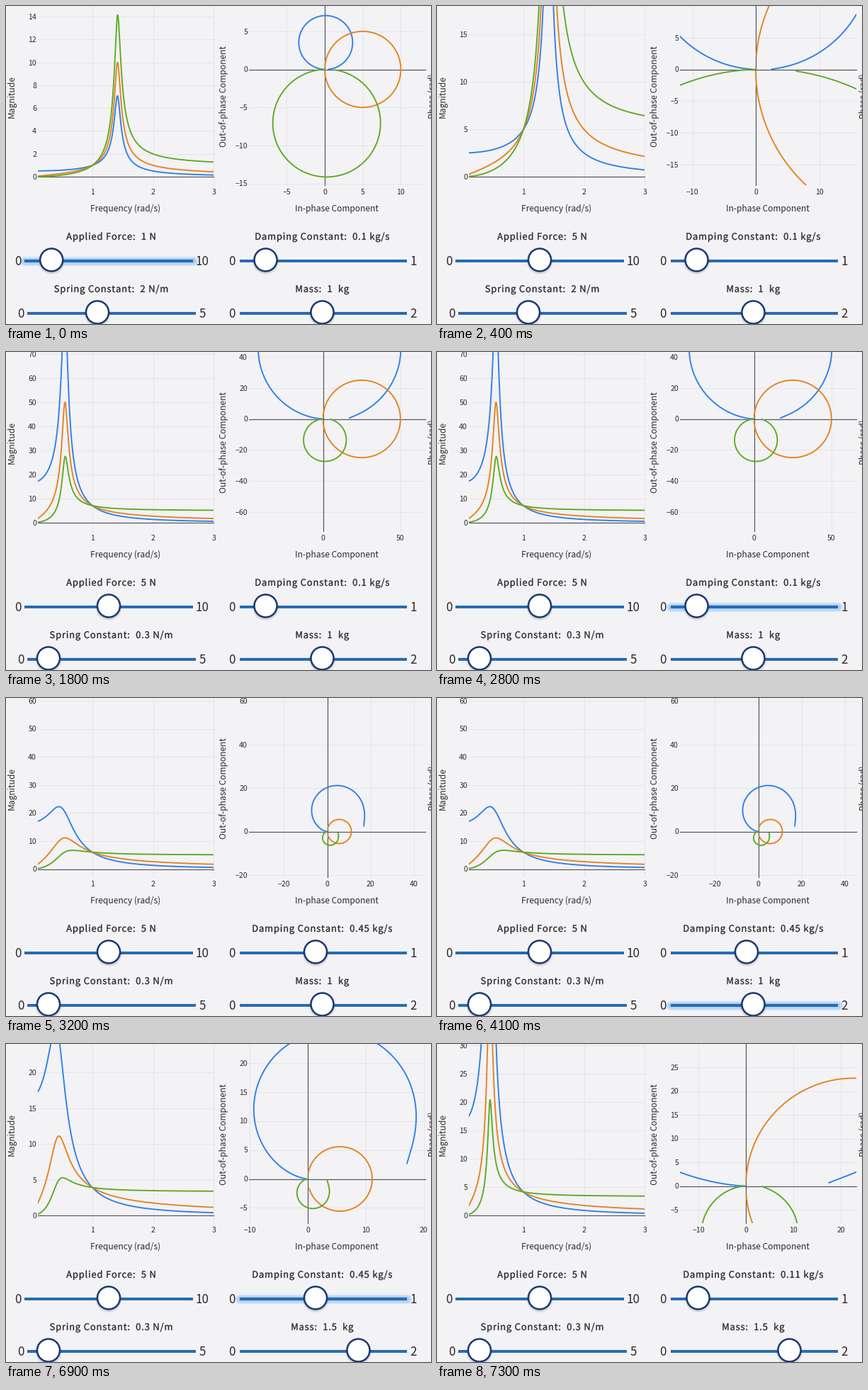
A matplotlib script that plays this animation: 600x449 px, repeating every 8000 ms.

```python
from functools import lru_cache

import numpy as np
import matplotlib.pyplot as plt
from matplotlib.animation import FuncAnimation
from matplotlib.patches import Circle, PathPatch, Rectangle
from matplotlib.path import Path
from matplotlib.textpath import TextPath
from matplotlib.transforms import Affine2D

W, H, DPI = 600, 449, 100
STEP_MS, LOOP_MS = 100, 8000
PT = 72 / DPI  # points per pixel
FONT = "Noto Sans CJK JP"

BG, GRID, AXIS, INK = "#f3f2f5", "#e5e5e8", "#55555a", "#2b2b2e"
TRACK, RING, GLOW = "#296bb3", "#1b3a70", "#5fb0f5"
BLUE, ORANGE, GREEN = "#2f80ea", "#e6831f", "#5dab22"

LEFT = (45, 293)       # horizontal extent of the magnitude plot
RIGHT = (343, 592)     # horizontal extent of the polar plot
BOTTOM = 253
OMEGA = np.linspace(0.1, 3, 1500)

# Views: left zero y, left scale, right zero x, right zero y, right scale
VIEW_START = np.array([241, 16.14, 450, 89.5, 10.74])
VIEW_FORCE = np.array([241, 13.4, 450, 89.5, 8.95])
VIEW_SPRING = np.array([241, 3.4, 447.5, 94.5, 2.187])
VIEW_DAMPED = np.array([241.5, 3.96, 453.5, 188.5, 3.065])
VIEW_MASS = np.array([242, 10.08, 426, 190.5, 8.19])
VIEW_END = np.array([242, 8.0, 436, 200.5, 6.7])

# start ms, (force, damping, spring, mass), view, tick steps (left y, right x, right y)
SCENES = [
    (0, (1, 0.1, 2, 1), VIEW_START, (2, 5, 5)),
    (300, (5, 0.1, 2, 1), VIEW_FORCE, (5, 10, 5)),
    (1800, (5, 0.1, 0.3, 1), VIEW_SPRING, (10, 50, 20)),
    (3100, (5, 0.45, 0.3, 1), VIEW_DAMPED, (10, 20, 20)),
    (4300, (5, 0.45, 0.3, 1.5), VIEW_MASS, (5, 10, 5)),
    (7100, (5, 0.28, 0.3, 1.5), VIEW_MASS + 0.5 * (VIEW_END - VIEW_MASS), (5, 10, 5)),
    (7200, (5, 0.16, 0.3, 1.5), VIEW_MASS + 0.85 * (VIEW_END - VIEW_MASS), (5, 10, 5)),
    (7300, (5, 0.11, 0.3, 1.5), VIEW_END, (5, 10, 5)),
]

# title, title centre, row y, track ends, thumb x at zero, px per unit,
# zero label x, maximum and its label x
SLIDERS = [
    ("Applied Force:  {:g} N", 148.5, 360, (26, 264), 44, 20.2, 17, "10", 277),
    ("Damping Constant:  {:g} kg/s", 446.3, 360, (330, 566), 346.4, 201.4, 318.7, "1", 575),
    ("Spring Constant:  {:g} N/m", 148.5, 434, (30, 268), 47.8, 40.6, 21, "5", 277),
    ("Mass:  {:g}  kg", 446.3, 434, (330, 566), 344.5, 102, 318.7, "2", 575),
]

# slider index, start ms, end ms
HOVERS = [(0, 0, 300), (2, 1400, 1800), (1, 2800, 3100), (3, 4100, 4300), (1, 6900, 7100)]

fig = plt.figure(figsize=(W / DPI, H / DPI), dpi=DPI, facecolor=BG)
ax = fig.add_axes([0, 0, 1, 1])
ax.set_xlim(0, W)
ax.set_ylim(H, 0)
ax.axis("off")
live = []


def panel(extent):
    x0, x1 = extent
    return Rectangle((x0, -1), x1 - x0, BOTTOM + 1, transform=ax.transData)


def line(x, y, color, width, clip=None, **kw):
    item, = ax.plot(x, y, color=color, lw=width * PT, **kw)
    if clip:
        item.set_clip_path(clip)
    return item


def text(x, y, s, px, ha="center", rotation=0):
    return ax.text(x, y, s, fontsize=px * PT, family=FONT, color=INK, ha=ha,
                   va="baseline", rotation=rotation, rotation_mode="anchor")


def ink_width(s, px):
    return TextPath((0, 0), s, size=px, prop={"family": FONT}).get_extents().width


@lru_cache(maxsize=None)
def advance(ch, px):
    return ink_width("|" + ch + "|", px) - ink_width("||", px)


@lru_cache(maxsize=None)
def spaced_path(s, px, gap):
    """Outline of s with letter spacing, centred on x = 0, y pointing down."""
    x, parts = 0, []
    for ch in s:
        if ch != " ":
            parts.append(TextPath((x, 0), ch, size=px, prop={"family": FONT}))
        x += advance(ch, px) + gap
    shift = Affine2D().translate(-(x - gap) / 2, 0).scale(1, -1)
    return Path.make_compound_path(*parts).transformed(shift)


def title(x, y, s):
    path = spaced_path(s, 13, 0.8).transformed(Affine2D().translate(x, y))
    return ax.add_patch(PathPatch(path, fc=INK, ec=INK, lw=0.35 * PT, zorder=3))


def ticks(low, high, step):
    return np.arange(np.ceil(low / step), np.floor(high / step) + 1) * step


def label(v):
    return f"{v:.0f}".replace("-", "\u2212") if v else "0"


def responses(force, damping, spring, mass):
    """Displacement, velocity and acceleration phasors."""
    x = force / (spring - mass * OMEGA**2 + 1j * damping * OMEGA)
    return x, 1j * OMEGA * x, -OMEGA**2 * x


def horizontals(extent, zero, scale, step):
    items = []
    for v in ticks((zero - BOTTOM) / scale, (zero - 1) / scale, step):
        y = zero - v * scale
        if v:
            items.append(line(extent, (y, y), GRID, 1, zorder=1))
        items.append(text(extent[0] - 2, y + 3.9, label(v), 10.5, "right"))
    items.append(line(extent, (zero, zero), AXIS, 1.2, zorder=1.5))
    return items


def draw_plots(values, view, steps):
    ly, ls, rx, ry, rs = view
    items = horizontals(LEFT, ly, ls, steps[0]) + horizontals(RIGHT, ry, rs, steps[2])
    for v in ticks((RIGHT[0] - rx) / rs, (RIGHT[1] - rx) / rs, steps[1]):
        x = rx + v * rs
        if v:
            items.append(line((x, x), (0, BOTTOM), GRID, 1, zorder=1))
        items.append(text(x, 265.5, label(v), 10.5))
    items.append(line((rx, rx), (0, BOTTOM), AXIS, 1.2, zorder=1.5))
    for z, color in zip(responses(*values), (BLUE, ORANGE, GREEN)):
        items.append(line(freq_x(OMEGA), ly - ls * abs(z), color, 1.9, panel(LEFT), zorder=2))
        items.append(line(rx + rs * z.real, ry + rs * z.imag, color, 1.9, panel(RIGHT), zorder=2))
    return items


def draw_thumb(slider, value):
    name, cx, y, _, zero, scale = slider[:6]
    x = zero + scale * value
    items = [title(cx, y - 30, name.format(value))]
    for r, alpha in ((18.8, 0.05), (17.6, 0.08)):
        items.append(ax.add_patch(Circle((x, y + 0.3), r, fc="black", ec="none",
                                         alpha=alpha, zorder=4)))
    items.append(ax.add_patch(Circle((x, y - 1.5), 16, fc="white", ec=RING,
                                     lw=2.5 * PT, zorder=5)))
    return items


def draw_glow(slider):
    y, track = slider[2], slider[3]
    return [line(track, (y, y), GLOW, w, alpha=0.17, zorder=2.5, solid_capstyle="round")
            for w in (6, 8.5, 11, 13.5)]


def freq_x(w):
    return 36.4 + 85.6 * w


def draw_static():
    for v in (1, 2, 3):
        x = freq_x(v)
        line((x, x), (0, BOTTOM), GRID, 1, zorder=1)
        text(x, 265.5, str(v), 10.5)
    text(168.5, 290, "Frequency (rad/s)", 12)
    text(466.5, 290, "In-phase Component", 12)
    text(12, 127.5, "Magnitude", 12, rotation=90)
    text(311, 127.5, "Out-of-phase Component", 12, rotation=90)
    text(606, 127.5, "Phase (rad)", 12, rotation=90)
    for _, _, y, track, _, _, zero_x, top, top_x in SLIDERS:
        line(track, (y, y), TRACK, 4, zorder=3, solid_capstyle="butt")
        text(zero_x, y + 6.5, "0", 17)
        text(top_x, y + 6.5, top, 17)


def update(frame):
    now = frame * STEP_MS
    while live:
        live.pop().remove()
    _, values, view, steps = [s for s in SCENES if s[0] <= now][-1]
    live.extend(draw_plots(values, view, steps))
    for slider, value in zip(SLIDERS, values_by_slider(values)):
        live.extend(draw_thumb(slider, value))
    for i, start, end in HOVERS:
        if start <= now < end:
            live.extend(draw_glow(SLIDERS[i]))
    return live


def values_by_slider(values):
    force, damping, spring, mass = values
    return force, damping, spring, mass


draw_static()
anim = FuncAnimation(fig, update, frames=LOOP_MS // STEP_MS, interval=STEP_MS,
                     init_func=lambda: update(0), repeat=True, repeat_delay=0, blit=False)
plt.show()
```
